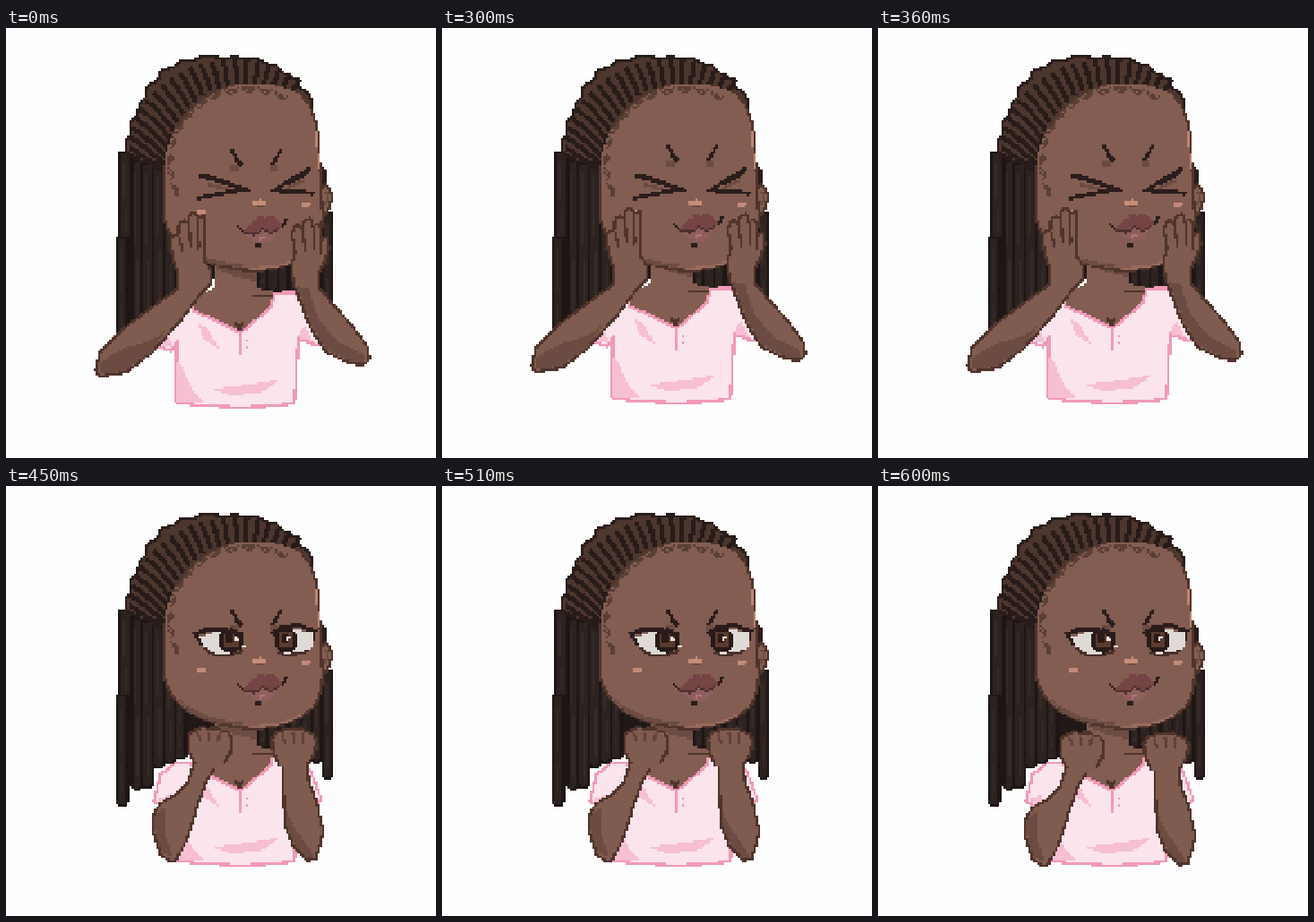
An HTML page with a canvas that plays this animation: 480 by 480 pixels, repeating every 0.65 s.

```html
<!DOCTYPE html>
<html>
<head>
<meta charset="utf-8">
<style>
html, body { margin: 0; width: 100%; height: 100%; overflow: hidden; background: #fefefe; }
canvas { display: block; width: 100vw; height: 100vh; image-rendering: pixelated; }
</style>
</head>
<body>
<canvas id="stage" width="192" height="192"></canvas>
<script>
const N = 192, CELL = 2.5;
const SKIN = '#835d51', ARM = '#805b4f', SHADE = '#6c4c42', EDGE = '#50352d', INK = '#2b1d1c';
const PINK = '#fbe4eb', ROSE = '#f6bfd2', TRIM = '#f29ab7', LOCK = '#2c2320';

const makeCanvas = () => Object.assign(document.createElement('canvas'), { width: N, height: N });
const brush = makeCanvas().getContext('2d', { willReadFrequently: true });
let page, dy = 0;

// Rasterise one path without antialiasing, at the coarse pixel size.
function ink(path, color, width) {
  brush.setTransform(1, 0, 0, 1, 0, 0);
  brush.clearRect(0, 0, N, N);
  brush.setTransform(1 / CELL, 0, 0, 1 / CELL, 0, dy / CELL);
  brush.fillStyle = brush.strokeStyle = color;
  brush.lineWidth = width || 1;
  const p = new Path2D(path);
  width ? brush.stroke(p) : brush.fill(p);
  const img = brush.getImageData(0, 0, N, N), d = img.data;
  for (let i = 3; i < d.length; i += 4) d[i] = d[i] > 105 ? 255 : 0;
  brush.putImageData(img, 0, 0);
  page.drawImage(brush.canvas, 0, 0);
}
const line = (path, color = EDGE, width = 2.7) => ink(path, color, width);
const shape = (path, fill, edge = EDGE) => { ink(path, fill); line(path, edge); };

function lock(x, top, w, bottom) {
  shape(`M${x} ${top}h${w}V${bottom - 3}l-3 3h${6 - w}l-3 -3Z`, LOCK, '#1e1715');
  line(`M${x + w * .4} ${top + 12}V${(top + bottom) / 2}m2 14V${bottom - 12}`, '#352b27', 2.5);
}

function backHair() {
  ink('M176 200H350V272L318 293H278L236 276L192 305H176Z', '#211917');
  for (const l of [[188, 225, 12, 304], [176, 190, 13, 308], [164, 152, 12, 314], [152, 150, 12, 336],
    [140, 148, 12, 338], [126, 139, 14, 240], [123, 234, 12, 356],
    [280, 250, 11, 293], [291, 250, 12, 293], [303, 250, 12, 294], [316, 250, 12, 296],
    [329, 250, 12, 300], [341, 235, 11, 308], [353, 206, 11, 326]]) lock(...l);
}

function torso() {
  ink('M234 258H280V290L306 296L300 314L262 342L200 320L212 300L232 290Z', SKIN);
  ink('M234 258H280V282Q258 280 234 268Z', SHADE);
  line('M276 298H298M256 328L260 336L264 328');
  shape('M190 308L172 322L165 352L184 361L190 350V418Q225 423 262 423T322 418L326 346L346 354L352 350L340 318L320 294L300 296L295 312L262 340L236 327L210 316L207 309Z', PINK, TRIM);
  ink('M190 372L197 378Q203 404 222 418L190 418Z', ROSE);
  ink('M230 403L270 398L306 392L286 406L252 410Z', ROSE);
  ink('M213 328L224 335L238 358L222 348Z', ROSE);
  ink('M324 345L334 332L342 350ZM168 350L182 345L186 358Z', ROSE);
  line('M262 343V364M268 347v3M268 355v3', TRIM, 2.5);
}

function hair() {
  shape('M134 138L133 126L139 118L138 106L147 96L149 84L157 76L157 66L169 58L173 48L186 44L194 37L207 37L218 32L230 31L242 34L255 32L268 35L280 34L291 40L302 42L310 50L322 56L326 66L337 72L342 84L330 120H182L177 152L150 148Z', '#4d362d', '#2a1e1b');
  for (let i = 0; i < 21; i++) {
    const a = Math.PI * (1.01 + i * .035), b = a - .2 + i * .008, m = (a + b) / 2 + .05;
    line(`M${255 + 118 * Math.cos(a)} ${136 + 101 * Math.sin(a)}Q${257 + 102 * Math.cos(m)} ${142 + 96 * Math.sin(m)} ${264 + 84 * Math.cos(b)} ${150 + 88 * Math.sin(b)}`, '#271c1a', 5);
  }
  line('M136 140L150 148L175 151', '#271c1a', 4);
}

// Laid baby hairs: paired arcs bulging inward along the hairline.
function curls() {
  const at = a => `${270 + 90 * Math.cos(a)} ${151 + 86 * Math.sin(a)}`;
  for (let a = 2.78; a < 5.3; a += .215)
    for (const [half, r] of [[.085, 8], [.042, 4]])
      line(`M${at(a - half)}A${r} ${r} 0 0 0 ${at(a + half)}`, '#5b4037', 2.5);
}

function head() {
  ink('M346 150L356 156L358 178L348 180Z', INK);
  shape('M350 180L356 175L361 179L364 187L361 200L356 208H350Z', SKIN);
  line('M355 185L359 184L357 198', SHADE, 2.5);
  ink('M177 214V150Q180 118 202 98Q226 70 258 63Q304 58 332 76Q346 92 348 124L351 168L353 206Q354 232 342 248Q318 270 275 271Q236 268 207 254Q183 240 177 214Z', SKIN);
  line('M177 152V214Q183 240 207 254Q236 268 275 271Q318 270 342 248Q354 232 353 206L348 120Q345 90 330 76');
  ink('M188 233Q208 254 246 262L276 265Q238 270 206 254Z', SHADE);
  line('M347 114V134M349 140V158', '#bd8571', 2.6);
  line('M272 268Q308 269 330 255', '#9a6c5d', 2.5);
  curls();
}

function iris(x, y, w, h) {
  const r = w / 2, k = h / 2;
  ink(`M${x} ${y + k}a${r} ${k} 0 0 1 ${w} 0a${r} ${k} 0 0 1 ${-w} 0Z`, '#281a18');
  ink(`M${x + 6} ${y + 5}h${w - 11}v${h - 11}h${11 - w}Z`, '#5a3b2e');
  ink(`M${x + 8} ${y + 6}h8v${k - 3}h-8Z`, '#2a1b19');
}

function openEyes() {
  ink('M215 169L238 162L262 164L266 180L250 187L232 187L221 181Z', '#e0dad7');
  ink('M302 164L322 160L345 164L341 180L330 186L308 187L301 180Z', '#e0dad7');
  iris(237, 159, 28, 27);
  iris(299, 158, 27, 28);
  ink('M254 169h5v4h-5ZM312 167h5v4h-5ZM264 176h3v5h-3Z', '#eee1d8');
  line('M209 166L222 161L242 160L264 166M297 165L308 158L326 155L346 163', INK, 4.6);
  line('M212 168L219 178M344 163L344 173', INK, 3);
  line('M219 180L232 188L252 188L264 184M301 185L312 188L330 187L339 182', '#48302a', 2.7);
}

function halfEyes() {
  ink('M212 174L240 170L262 174L264 182L250 187H231L219 182Z', '#e0dad7');
  ink('M304 174L330 168L346 170L343 180L331 186H308Z', '#e0dad7');
  iris(238, 166, 25, 21);
  iris(305, 166, 24, 21);
  line('M208 172L221 164L242 165L264 173M297 174L310 165L328 164L347 168', INK, 7);
  line('M219 183L232 188L250 188L262 184M303 184L312 188L330 187L340 181', '#48302a', 2.7);
}

function shutEyes() {
  line('M215 164L240 171L266 180L242 184L212 190M340 157L322 166L300 181L319 183L344 184', INK, 4.3);
  line('M220 164L250 174M337 161L314 173', INK, 4);
  line('M225 174L247 180M332 170L314 179', SHADE, 3);
}

function features({ brow, mouth, eyes }) {
  const base = dy;
  dy = base + brow;
  line('M251 135L255 142L263 153M307 135L302 145L296 154', INK, 3.4);
  line('M256 145L263 153M302 145L296 154', INK, 4.6);
  ink('M251 153h9v7h-9ZM294 153h9v7h-9Z', SHADE);
  dy = base;
  eyes();
  ink('M274 194h7v-3h5v3h5v4h-17Z', '#c58d79');
  ink('M213 202h10v5h-10ZM329 195h10v4h-10Z', '#c28a79');
  ink('M280 198h8v3h-8Z', SHADE);
  dy = base + mouth;
  line('M257 219L262 225L270 227M304 222L310 219L313 212', INK, 2.7);
  ink('M266 227L270 220L278 215L283 209L289 212L295 209L303 213L308 220L300 227L293 230L287 225L278 231L268 230Z', '#754444');
  ink('M267 230L278 231L287 225L293 230L302 227L298 236L289 240L276 237Z', '#8f5f5d');
  line('M266 229L278 230L287 224L294 229L305 224', '#4e3030', 2.5);
  line('M282 235L291 234', '#a97675', 2.5);
  dy = base;
  ink('M278 239h7v5h-7Z', INK);
}

function cheekArms() {
  shape('M190 292L192 274L186 256L183 238L187 231L192 232L193 219L199 214L203 218L205 208L212 206L214 212L220 209L222 219V261L229 270L228 286L215 299L198 322L164 361L134 384L104 389L100 382L105 361L130 336Z', ARM);
  ink('M104 386L106 372L134 357L164 348L180 335L162 361L133 382Z', SHADE);
  line('M193 232L197 249M204 218L206 246M214 212L215 247');
  shape('M321 286L318 266L323 250L319 232L321 221L327 219L331 227L332 215L339 212L343 222L348 218L352 224V236L359 234L360 246L354 264L348 276V289L364 307L386 332L404 357L405 370L399 376L382 373L356 361L339 333Z', ARM);
  ink('M324 288L338 292L348 324L370 350L401 366L399 374L382 371L357 359L341 332Z', SHADE);
  line('M331 227L334 249M343 222L343 247M352 236L350 252');
}

// The wrist side stays open so the fist flows into the forearm.
function fist(x, y) {
  const rim = `M${x + 8} ${y + 41}L${x + 1} ${y + 28}L${x} ${y + 12}L${x + 3} ${y + 5}L${x + 11} ${y + 3}L${x + 16} ${y}L${x + 23} ${y + 2}L${x + 32} ${y}L${x + 38} ${y + 4}L${x + 45} ${y + 6}L${x + 49} ${y + 14}L${x + 47} ${y + 29}L${x + 39} ${y + 42}`;
  ink(rim + `L${x + 26} ${y + 47}Z`, ARM);
  line(rim);
  line(`M${x + 11} ${y + 6}l3 11M${x + 23} ${y + 5}l1 12M${x + 35} ${y + 6}l-1 11`, '#60433a', 2.5);
}

function wideArms() {
  shape('M188 304L176 322L151 348L131 368V404L147 412L178 395L184 375L192 352L205 327L214 308Z', ARM);
  ink('M133 370L151 352L155 376L146 409L133 402Z', SHADE);
  shape('M323 308L330 342L332 361L345 382L368 403L382 411L395 407V372L374 349L356 329L344 308Z', ARM);
  ink('M330 344L350 372L392 405L382 409L366 400L346 380L334 360Z', SHADE);
  fist(184, 264);
  fist(299, 271);
}

function tuckedArms() {
  shape('M210 308L203 331L188 345L172 354L163 369V381L172 411L183 419L190 417L202 394L213 358L223 330L236 308Z', ARM);
  ink('M166 367L178 358L176 384L186 414L173 408L165 381Z', SHADE);
  shape('M308 306L311 376L320 401L336 418L346 415L354 386L347 354L338 330L335 306Z', ARM);
  ink('M312 360L322 382L344 413L336 416L322 400L312 376Z', SHADE);
  fist(203, 269);
  fist(297, 270);
}

function pose({ at = 0, body = 0, arm = 0, brow = 0, mouth = 0, eyes = openEyes, arms = tuckedArms }) {
  const canvas = makeCanvas();
  page = canvas.getContext('2d');
  dy = at;
  backHair();
  dy = at + body;
  torso();
  dy = at;
  hair();
  head();
  features({ brow, mouth, eyes });
  dy = at + arm;
  arms();
  return canvas;
}

const poses = [
  [300, { eyes: shutEyes, arms: cheekArms }],
  [400, { eyes: shutEyes, arms: cheekArms, body: -5, arm: -5, brow: -5, mouth: -2.5 }],
  [450, { eyes: halfEyes, arms: wideArms, brow: 2.5 }],
  [550, { brow: 2.5 }],
  [600, { at: 2.5, arm: 5, brow: -5 }],
  [650, { arm: 5, brow: 2.5 }]
].map(([end, p]) => [end, pose(p)]);

const view = document.getElementById('stage').getContext('2d');
function draw(now) {
  const t = now % 650;
  view.clearRect(0, 0, N, N);
  view.drawImage(poses.find(([end]) => t < end)[1], 0, 0);
  requestAnimationFrame(draw);
}
draw(0);
</script>
</body>
</html>
```
